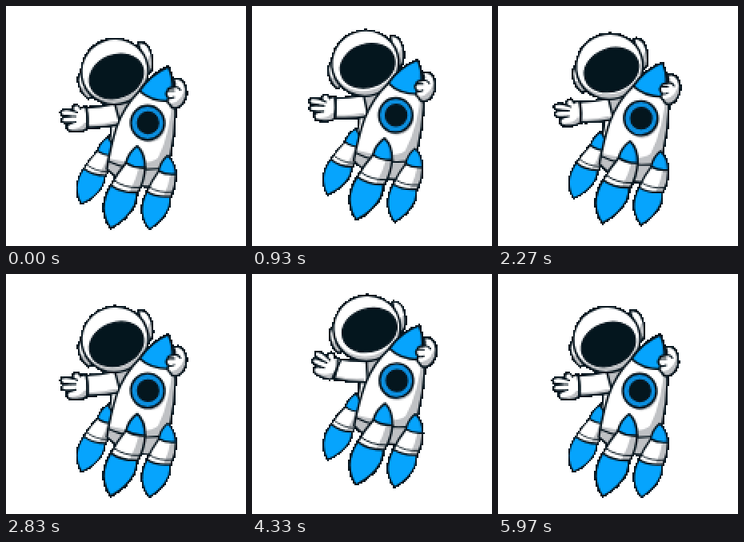
An HTML page with a canvas that plays this animation: 300x300 px, repeating every 6010 ms.

```html
<!DOCTYPE html>
<html lang="en">
<head>
<meta charset="utf-8">
<title>Floating astronaut</title>
<style>
  html, body { margin: 0; width: 100%; height: 100%; overflow: hidden; background: #fff; }
  canvas { display: block; width: 300px; height: 300px; image-rendering: pixelated; }
</style>
</head>
<body>
<canvas id="stage" width="150" height="150"></canvas>
<script>
const ctx = document.getElementById('stage').getContext('2d', { willReadFrequently: true });
const LOOP = 6010, BOB = LOOP / 2, LEAD = 40;
const INK = '#07161f', BLUE = '#06a4fd', DEEP = '#0b8fe0', WHITE = '#fff', GREY = '#bfc1c4', GLASS = '#04161e';

// Filled shape with optional shading clipped inside it, then its outline.
function shape(d, fill, shade, tone = GREY, width = 2.8) {
  const path = new Path2D(d);
  ctx.fillStyle = fill;
  ctx.fill(path);
  if (shade) {
    ctx.save();
    ctx.clip(path);
    ctx.fillStyle = tone;
    ctx.fill(new Path2D(shade));
    ctx.restore();
  }
  ctx.lineWidth = width;
  ctx.stroke(path);
}

function line(d, width = 2.2) {
  ctx.lineWidth = width;
  ctx.stroke(new Path2D(d));
}

function oval(x, y, rx, ry, turn, fill, width) {
  ctx.beginPath();
  ctx.ellipse(x, y, rx, ry, turn, 0, 7);
  ctx.fillStyle = fill;
  ctx.fill();
  if (width) {
    ctx.lineWidth = width;
    ctx.stroke();
  }
}

function turned(x, y, angle, draw) {
  ctx.save();
  ctx.translate(x, y);
  ctx.rotate(angle);
  ctx.translate(-x, -y);
  draw();
  ctx.restore();
}

function torso() {
  shape('M122 116 L154 112 L160 150 L140 186 L126 176 Q132 164 131 148 Z', WHITE,
    'M118 116 Q140 130 158 112 L164 190 L136 190 L139 150 L133 126 Z');
}

function hand() {
  shape('M101 127 Q96 125 93 128 Q91 122 86 124 Q82 126 84 131 Q76 128 70 130 ' +
    'Q66 134 71 137 L80 138 Q70 138 69 142 Q69 146 74 146 L82 146 Q75 148 76 152 ' +
    'Q77 158 85 157 Q96 158 102 153 Z', WHITE,
    'M80 154 Q93 154 98 146 L104 146 L104 160 L80 160 Z');
  line('M81 138 L87 138 M82 146 L87 145 M84 131 L89 133');
}

function arm(raise) {
  turned(133, 138, raise * .17, () => {
    shape('M100 127 Q118 126 136 122 L143 148 Q120 153 101 152 Z', WHITE,
      'M100 148 Q120 149 137 144 L144 156 L100 157 Z');
    turned(101, 140, raise * .26, hand);
    line('M100 128 Q104 140 101 153');
  });
}

// The visor slides up inside the shell as the head lifts.
function helmet(lift) {
  shape('M97 79 Q90 84 90 93 Q92 109 103 116 L110 112 Z', WHITE, 'M92 101 L106 104 L106 118 L96 113 Z');
  shape('M165 46 Q174 44 179 53 Q185 65 183 78 Q181 84 175 84 Z', WHITE, 'M179 62 L187 64 L184 86 L174 86 Z');
  const shell = new Path2D();
  shell.ellipse(136, 82, 42, 41, -.35, 0, 7);
  ctx.save();
  ctx.clip(shell);
  oval(136, 82, 43, 42, 0, GREY);
  oval(134, 77, 42, 40, -.35, WHITE);
  ctx.restore();
  ctx.lineWidth = 2.8;
  ctx.stroke(shell);
  oval(138 + 1.5 * lift, 88 - 4 * lift, 34.5, 26.5, -.38, GLASS, 2.4);
}

function hull() {
  shape('M203 76 Q182 85 167 106 Q147 126 138 152 Q131 174 126 204 Q150 230 196 226 ' +
    'Q206 194 210 160 Q216 108 203 76 Z', WHITE,
    'M208 112 Q206 158 190 190 Q176 202 126 190 L118 230 L212 232 L222 110 Z');
  shape('M203 76 Q181 85 167 106 Q180 119 204 119 Q213 99 203 76 Z', BLUE,
    'M203 76 Q208 98 200 122 L216 120 Z', DEEP);
  line('M128 194 Q158 209 204 202');
  oval(179, 149, 21, 21.5, 0, GREY);
  oval(177, 146, 21, 21.5, 0, DEEP, 2.8);
  oval(177.5, 146, 13, 13.2, 0, GLASS, 2.4);
}

// Slanted booster placed by the tip of its cone.
function booster(x, y, size, lean) {
  ctx.save();
  ctx.translate(x, y);
  ctx.rotate(lean);
  ctx.scale(size, size);
  shape('M-33 49 Q-42 64 -42 78 Q-41 93 -33 103 Q-12 92 -3 74 Q0 66 0 57 Z', BLUE);
  shape('M-14 21 Q-25 34 -33 49 Q-20 59 1 58 Q9 44 10 27 Z', WHITE,
    'M3 24 Q-1 42 -11 60 L6 62 L14 24 Z');
  shape('M0 0 Q-11 8 -14 21 Q-4 28 10 27 Q10 9 0 0 Z', BLUE,
    'M0 0 Q8 13 5 29 L14 29 L12 8 Z', DEEP);
  line('M-29 43 Q-16 53 3 52', 1.8);
  ctx.restore();
}

function grip() {
  shape('M209 92 Q218 88 223 97 Q227 104 225 114 Q221 126 212 128 Q206 128 205 123 ' +
    'Q200 120 203 115 Q198 110 202 106 Q202 102 208 102 L211 101 Q212 96 209 92 Z', WHITE,
    'M224 99 Q222 119 206 122 L209 132 L232 126 L228 98 Z');
  line('M203 115 Q207 116 210 114 M203 106 L210 106 M211 101 Q216 101 218 105');
}

function figure(lift, raise) {
  ctx.save();
  ctx.translate(0, -14 * lift);
  turned(150, 250, .035 * lift, () => {
    torso();
    arm(raise);
    turned(140, 120, .05 * lift, () => helmet(lift));
    booster(127, 164, .83, .06);
    hull();
    booster(202, 187, .88, -.07);
    booster(164, 175, 1, 0);
    grip();
  });
  ctx.restore();
}

// Hard silhouette edge, as on a one-bit mask.
function harden() {
  const image = ctx.getImageData(0, 0, 150, 150), px = image.data;
  for (let i = 3; i < px.length; i += 4) px[i] = px[i] > 110 ? 255 : 0;
  ctx.putImageData(image, 0, 0);
}

function draw(now) {
  const t = now % LOOP;
  const lift = (1 - Math.cos((t + LEAD) / BOB * 2 * Math.PI)) / 2;
  const k = Math.min(1, Math.max(0, (lift - .66) / .26));
  ctx.setTransform(1, 0, 0, 1, 0, 0);
  ctx.clearRect(0, 0, 150, 150);
  ctx.scale(.5, .5);
  ctx.strokeStyle = INK;
  ctx.lineJoin = ctx.lineCap = 'round';
  figure(lift, k * k * (3 - 2 * k));
  harden();
}

const start = performance.now();
function tick() {
  draw(performance.now() - start);
  requestAnimationFrame(tick);
}
tick();
</script>
</body>
</html>
```
